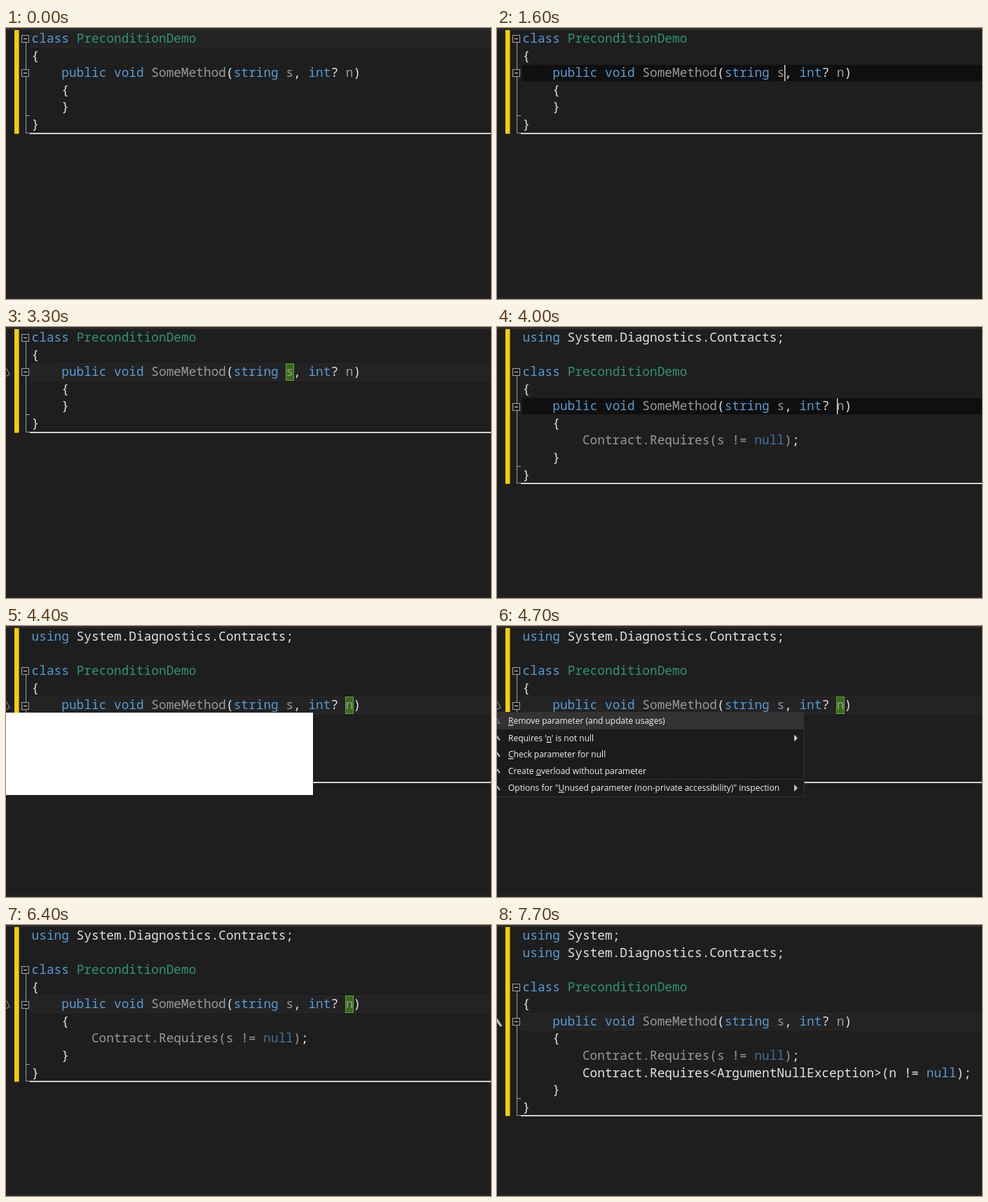
Write an HTML page that moves like this. It is 692 px wide and 388 px high and loops after 7.8 s.

```html
<!DOCTYPE html>
<html lang="en">
<head>
<meta charset="utf-8">
<title>Precondition demo</title>
<style>
  html, body { margin: 0; width: 100%; height: 100%; overflow: hidden; background: #1e1e1e; }
  svg { display: block; width: 692px; height: 388px; }
  text { white-space: pre; }
  .code { font: 500 17.8px "Noto Sans Mono", "DejaVu Sans Mono", monospace; fill: #e4e4e4; }
  .key { fill: #569cd6; }
  .type { fill: #2f9478; }
  .unused, .dim { fill: #9a9a9a; }
  .dim .key { fill: #40729b; }
  .end { fill: #e4e4e4; }
  .menu { font: 12px "Open Sans", "Noto Sans", sans-serif; fill: #f1f1f1; }
  .mnemonic { text-decoration: underline; }
  .outline { fill: none; stroke: #a0a0a0; }
</style>
</head>
<body>
<svg id="stage" viewBox="0 0 692 388"></svg>
<script>
const LOOP = 7800, LEFT = 36.6, CHAR = 10.68, ROW = 24.58;
const stage = document.getElementById('stage');

const rowY = row => 15.3 + row * ROW;
const rowTop = row => Math.floor(rowY(row) - 12);
const colX = col => LEFT + col * CHAR;
const rect = (x, y, w, h, fill, extra = '') =>
  `<rect x="${x}" y="${y}" width="${w}" height="${h}" fill="${fill}" ${extra}/>`;
const path = (d, attrs = 'class="outline"') => `<path d="${d}" ${attrs}/>`;
const escapeText = s => s.replace(/&/g, '&amp;').replace(/</g, '&lt;').replace(/>/g, '&gt;');
const span = (cls, s) => `<tspan class="${cls}">${s}</tspan>`;

const CLASS = [
  'class PreconditionDemo',
  '{',
  '    public void SomeMethod(string s, int? n)',
  '    {',
  '    }',
  '}'
];
const USING = 'using System.Diagnostics.Contracts;';
const REQUIRE_S = '        Contract.Requires(s != null);';
const REQUIRE_N = '        Contract.Requires<ArgumentNullException>(n != null);';
const withBody = (usings, body) =>
  [...usings, '', ...CLASS.slice(0, 4), ...body, ...CLASS.slice(4)];

const DOCS = [
  CLASS,
  withBody([USING], [REQUIRE_S]),
  withBody(['using System;', USING], [REQUIRE_S, REQUIRE_N])
];

function codeLine(line, row) {
  const signature = line.includes('SomeMethod');
  const dim = line === REQUIRE_S;
  const body = escapeText(line).replace(
    /\b(?:class|public|void|string|int|null|using)\b|PreconditionDemo|SomeMethod|\b[sn]\b|;$/g,
    word => {
      if (word === 'PreconditionDemo') return span('type', word);
      if (/^(SomeMethod|s|n)$/.test(word)) return signature ? span('unused', word) : word;
      if (word === ';') return span('end', word);
      return span('key', word);
    });
  return `<text class="code ${dim ? 'dim' : ''}" x="${LEFT}" y="${Math.round(rowY(row) + 5.7)}">${body}</text>`;
}

function foldBox(row) {
  const y = Math.round(rowY(row)) + .5;
  return rect(22.5, y - 5, 10, 10, '#1e1e1e', 'stroke="#a0a0a0"') +
    path(`M25 ${y}h5`, 'stroke="#dcdcdc"');
}

function editor(lines, state) {
  const first = lines.indexOf(CLASS[0]), method = lines.indexOf(CLASS[2]);
  const last = lines.length - 1;
  const end = Math.round(rowY(last) + 12.35);
  const inner = Math.round(rowY(last - 1) + 12.35) - .5;
  const top = rowTop(state.row);
  let out = rect(0, 0, 692, 3, '#2d2d30') + rect(0, 385, 692, 3, '#242425');
  out += rect(35.5, top + .5, 660, 24, state.focus ? '#0f0f0f' : '#232323',
    `stroke="${state.focus ? '#1c1c1c' : '#292929'}"`);
  out += rect(12, 3, 6.5, end - 2.5, '#f5d000');
  out += path(`M28.5 ${rowY(first)}V${end - .5}H34M28.5 ${inner}H34`);
  out += foldBox(first) + foldBox(method);
  out += rect(34, end - 1, 658, 2, '#cfcfcf');
  if (state.mark) {
    out += rect(Math.round(colX(state.mark)) - .5, top + .5, 11, 24, '#386a17', 'stroke="#6b9b45"');
  }
  out += lines.map(codeLine).join('');
  if (state.caret) out += rect(Math.round(colX(state.caret)), top + 1, 1.3, 23, '#e8e8e8');
  return out;
}

const pencil = y => path(`M-3 ${y - 7}L0 ${y - 6}L5.5 ${y + 3.5}L0 ${y + 6}H-3`);
const handle = (y, size = 1) =>
  path(`M-2 ${y - 5 * size}L${4 * size} ${y + 3 * size}`, `stroke="#c8c8c8" stroke-width="${2 * size}"`);
const arrow = y => path(`M424 ${y - 5}L429 ${y}L424 ${y + 5}Z`, 'fill="#c8c8c8"');
const hammer = y => path(`M450 ${y - 1}L457 ${y + 6}`, 'stroke="#d0d0d0" stroke-width="2.4"') +
  path(`M443 ${y}L449 ${y - 6}L454 ${y - 6}L451 ${y - 4}L452 ${y - 1}L449 ${y + 1}L447 ${y - 1}L445 ${y + 2}Z`, 'fill="#d0d0d0"');

// An underscore marks the mnemonic letter of a label.
const label = (x, y, s) => `<text class="menu" x="${x}" y="${y + 4.4}">` +
  s.replace(/_(.)/, (_, letter) => span('mnemonic', letter)) + '</text>';

function menu(top, name, selected) {
  const items = [
    '_Remove parameter (and update usages)',
    `Requires '_${name}' is not null`,
    '_Check parameter for null',
    'Create _overload without parameter',
    'Options for "_Unused parameter (non-private accessibility)" inspection'
  ];
  const offsets = [12, 36.5, 60, 83.5, 108];
  let out = rect(-1, top - .5, 439, 121, '#1b1b1c', 'stroke="#333337"');
  out += rect(0, top + offsets[selected] - 12, 437, 24, '#333334');
  if (selected === 1) out += rect(417, top + 26.5, 18, 20, '#1683d8');
  out += path(`M16 ${top + 95.5}H436`, 'stroke="#333337"');
  items.forEach((item, i) => {
    const y = top + offsets[i];
    out += label(16, y, item);
    out += i ? handle(y) : path(`M-2 ${y - 6}L4 ${y + 3}H-2`);
    if (i === 1 || i === 4) out += arrow(y);
  });
  return out;
}

function submenu(top, selected) {
  const items = ["_Requires 'n' is not null", "Requires 'n' is not null (with _ArgumentNullException)"];
  let out = rect(439.5, top + 23.5, 260, 49, '#1b1b1c', 'stroke="#333337"');
  out += rect(441, top + 25 + selected * 23.5, 251, 23, '#333334');
  return out + items.map((item, i) => {
    const y = top + 37 + i * 23.5;
    return hammer(y) + label(470, y, item);
  }).join('');
}

// Each step changes only the listed parts of the state.
const STEPS = [
  [0, { doc: 0, row: 0, focus: false, caret: 0, mark: 0, icon: '', menu: '', pick: 0, sub: -1 }],
  [1000, { row: 2, focus: true }],
  [1200, { caret: 35 }],
  [1800, { focus: false, caret: 0, mark: 34, icon: 'pencil' }],
  [1900, { menu: 'blank' }],
  [2000, { menu: 's' }],
  [2400, { pick: 1 }],
  [2700, { menu: '', pick: 0 }],
  [3600, { doc: 1, row: 4, focus: true, caret: 35, mark: 0, icon: '' }],
  [4000, { caret: 42 }],
  [4200, { focus: false, caret: 0, mark: 42, icon: 'pencil' }],
  [4400, { menu: 'blank' }],
  [4500, { menu: 'n' }],
  [5000, { pick: 1 }],
  [5400, { sub: 0 }],
  [5800, { sub: 1 }],
  [6000, { menu: '', sub: -1 }],
  [6500, { doc: 2, row: 5, focus: true, caret: 43, mark: 0, icon: '' }],
  [7000, { icon: 'handle' }],
  [7400, { focus: false, caret: 0 }]
];

function draw(state) {
  const y = rowTop(state.row) + 12.5;
  const top = rowTop(state.row) + 23;
  let out = editor(DOCS[state.doc], state);
  if (state.icon === 'pencil') out += pencil(y);
  if (state.icon === 'handle') out += handle(y + 2, 1.5);
  if (state.menu === 'blank') out += rect(0, top, 438, 118, '#fff');
  else if (state.menu) out += menu(top, state.menu, state.pick);
  if (state.sub >= 0) out += submenu(top, state.sub);
  stage.innerHTML = out;
}

let shown = -1;
function tick() {
  const time = performance.now() % LOOP;
  const passed = STEPS.filter(([start]) => start <= time);
  if (passed.length !== shown) {
    shown = passed.length;
    draw(Object.assign({}, ...passed.map(([, change]) => change)));
  }
  requestAnimationFrame(tick);
}
tick();
</script>
</body>
</html>
```
